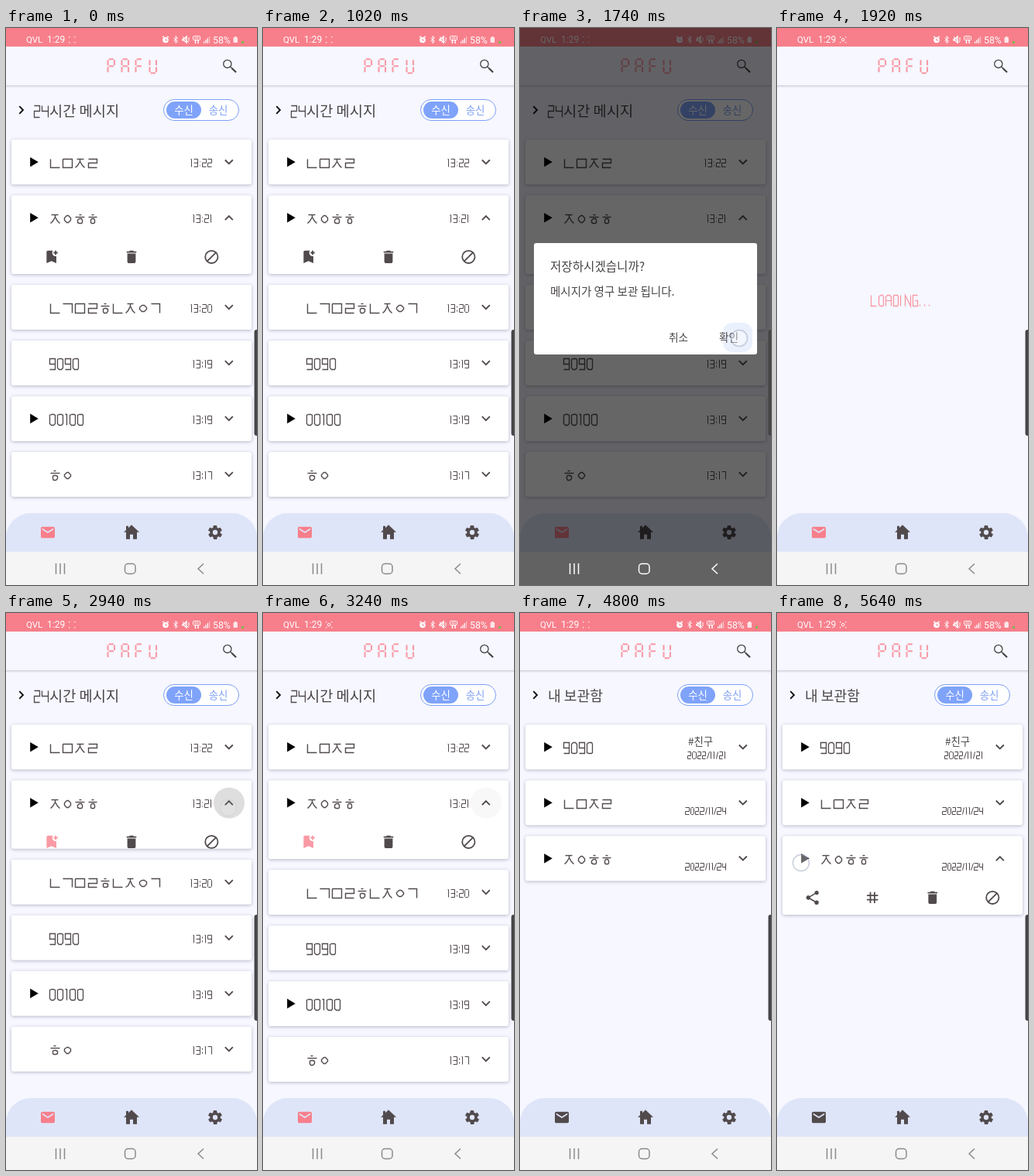
An HTML page with a canvas that plays this animation: 324x720 px, repeating every 5700 ms.

```html
<!DOCTYPE html>
<html lang="ko">
<head>
<meta charset="utf-8">
<style>
html, body { margin: 0; width: 100%; height: 100%; overflow: hidden; background: #f6f7ff; }
canvas { display: block; }
</style>
</head>
<body>
<canvas id="stage" width="324" height="720"></canvas>
<script>
const c = document.getElementById('stage').getContext('2d');
const LOOP = 5700, STEP = 60;
const INK = '#514a4d', CORAL = '#f77f8b', PALE = '#f99aa5', BLUE = '#7d9ff5', BG = '#f6f7ff';
const KR = '"Noto Sans CJK KR", "Noto Sans CJK", sans-serif';

const ramp = (t, a, b) => Math.min(1, Math.max(0, (t - a) / (b - a)));
const smooth = u => u < .5 ? 2 * u * u : 1 - 2 * (1 - u) ** 2;
const within = (t, a, b) => t >= a && t < b;

// LCD glyphs: polylines of xy digit pairs, digits and letters on a 4 x 8 grid
const GLYPHS = {
  0: '103041473818070110', 1: '001018', 2: '004044040848', 3: '00404808 0444',
  4: '000444 4048', 7: '004048', 9: '440400404808',
  ':': '1213 1617', '/': '2008', '.': '0708',
  L: '000848', O: '103041473818070110', A: '080110304148 0444', D: '00304147380800',
  I: '0008', N: '08004840', G: '400008484424'
};
const NARROW = '1:/.I';
// jamo on an 8 x 8 grid
const JAMO = {
  ㄴ: '000888', ㄱ: '008088', ㅁ: '0080880800', ㄹ: '008084040888', ㅈ: '1070 40422608 426688',
  ㅇ: '315173755737151331', ㅎ: '3050 0282 345465675838272534'
};
const SEGMENTS = { a: [0, 0, 1, 0], b: [1, 0, 1, 1], c: [1, 1, 1, 2], d: [0, 2, 1, 2],
  e: [0, 1, 0, 2], f: [0, 0, 0, 1], g: [0, 1, 1, 1] };
const LOGO = { P: 'abefg', A: 'abcefg', F: 'aefg', U: 'bcdef' };

const icons = {
  trash: 'M6 19a2 2 0 0 0 2 2h8a2 2 0 0 0 2-2V7H6zM19 4h-3.5l-1-1h-5l-1 1H5v2h14z',
  save: 'M21 7h-2v2h-2V7h-2V5h2V3h2v2h2zM19 21l-7-3-7 3V5c0-1.1.9-2 2-2h7a5 5 0 0 0 5 7.9z',
  block: 'M12 2a10 10 0 1 0 0 20 10 10 0 0 0 0-20zM4 12A8 8 0 0 1 16.9 5.7L5.7 16.9A8 8 0 0 1 4 12zM12 20a8 8 0 0 1-4.9-1.7L18.3 7.1A8 8 0 0 1 12 20z',
  share: 'M18 16.1c-.8 0-1.4.3-2 .8l-7.1-4.2a3.3 3.3 0 0 0 0-1.4l7-4.1A3 3 0 1 0 15 5c0 .2 0 .5.1.7L8 9.8a3 3 0 1 0 0 4.4l7.1 4.2a3 3 0 1 0 2.9-2.3z',
  hash: 'M20 10V8h-4V4h-2v4h-4V4H8v4H4v2h4v4H4v2h4v4h2v-4h4v4h2v-4h4v-2h-4v-4zM14 14h-4v-4h4z',
  mail: 'M20 4H4a2 2 0 0 0-2 2v12c0 1.1.9 2 2 2h16a2 2 0 0 0 2-2V6a2 2 0 0 0-2-2zm0 4-8 5-8-5V6l8 5 8-5z',
  home: 'M12 2.5L8 6.5V4H5v5.3L2 12h3v9h5v-6h4v6h5v-9h3z',
  gear: 'M19.4 13a7.5 7.5 0 0 0 0-2l2.1-1.6a.5.5 0 0 0 .1-.6l-2-3.5a.5.5 0 0 0-.6-.2l-2.5 1a7.3 7.3 0 0 0-1.7-1l-.4-2.6a.5.5 0 0 0-.5-.5h-4a.5.5 0 0 0-.5.5l-.4 2.6a7.3 7.3 0 0 0-1.7 1l-2.5-1a.5.5 0 0 0-.6.2l-2 3.5a.5.5 0 0 0 .1.6L4.6 11a7.5 7.5 0 0 0 0 2l-2.1 1.6a.5.5 0 0 0-.1.6l2 3.5c.1.2.4.3.6.2l2.5-1a7.3 7.3 0 0 0 1.7 1l.4 2.6c0 .3.2.5.5.5h4c.3 0 .5-.2.5-.5l.4-2.6a7.3 7.3 0 0 0 1.7-1l2.5 1c.2.1.5 0 .6-.2l2-3.5a.5.5 0 0 0-.1-.6zM12 15.5a3.5 3.5 0 1 1 0-7 3.5 3.5 0 0 1 0 7z'
};
for (const name in icons) icons[name] = new Path2D(icons[name]);

function icon(name, x, y, color = INK, scale = .9) {
  c.save();
  c.translate(x - 12 * scale, y - 12 * scale);
  c.scale(scale, scale);
  c.fillStyle = color;
  c.fill(icons[name], 'evenodd');
  c.restore();
}

function text(str, x, cy, size, color = '#4a4648', font = KR, align = 'left') {
  c.font = `${size}px ${font}`;
  c.textAlign = align;
  c.fillStyle = color;
  c.fillText(str, x, cy + size * .37);
}

function line(points, color, width = 1) {
  c.strokeStyle = color;
  c.lineWidth = width;
  c.beginPath();
  for (let i = 0; i < points.length; i += 2) c.lineTo(points[i], points[i + 1]);
  c.stroke();
}

function box(x, y, w, h, r, fill, stroke) {
  c.beginPath();
  c.roundRect(x, y, w, h, r);
  if (fill) { c.fillStyle = fill; c.fill(); }
  if (stroke) { c.strokeStyle = stroke; c.stroke(); }
}

function raised(x, y, w, h, blur = 4) {
  c.save();
  c.shadowColor = 'rgba(50,50,80,.33)';
  c.shadowBlur = blur;
  c.shadowOffsetY = 1;
  box(x, y, w, h, 3, '#fff');
  c.restore();
}

function disc(x, y, r, fill, stroke) {
  box(x - r, y - r, 2 * r, 2 * r, r, fill, stroke);
}

// strokes sit on pixel centres to stay crisp
function glyph(code, x, y, ux, uy, color, width) {
  const snap = v => Math.floor(v) + .5;
  for (const stroke of code.split(' '))
    line([...stroke].map((d, i) => snap(i % 2 ? y + d * uy : x + d * ux)), color, width);
}

const lcdWidth = (str, h) =>
  [...str].reduce((sum, ch) => sum + (NARROW.includes(ch) ? .42 : .7) * h, 0);

function lcd(str, x, cy, h, color = INK, right = false) {
  if (right) x -= lcdWidth(str, h) - .14 * h;
  for (const ch of str) {
    glyph(GLYPHS[ch], x + .4, cy - h / 2, h * .12, h / 8, color, h > 12 ? 1.3 : 1);
    x += lcdWidth(ch, h);
  }
}

function jamo(str, x, cy) {
  [...str].forEach((ch, i) => glyph(JAMO[ch], x + i * 16.2 + .5, cy - 5.5, 1.45, 1.4, INK, 1.4));
}

function chevron(x, y, up, color = INK) {
  const s = up ? -1 : 1;
  line([x - 5, y - 2.5 * s, x, y + 2.5 * s, x + 5, y - 2.5 * s], color, 1.9);
}

function statusBar(t) {
  const white = '#fff';
  c.fillStyle = CORAL;
  c.fillRect(0, 0, 324, 24);
  text('QVL', 26, 15, 11.5, white, 'Roboto, sans-serif');
  text('1:29', 53, 15, 12, white, 'Roboto, sans-serif');
  text('58%', 267, 15, 12.3, white, 'Roboto, sans-serif');
  c.fillStyle = 'rgba(255,255,255,.85)';
  const busy = Math.floor((t - 120) / 300) % 2 === 0;
  for (const x of [81, 88]) for (const y of [11, 18]) c.fillRect(x, y, 1.4, 1.4);
  if (busy) {
    c.lineWidth = 1;
    disc(85.2, 15.2, 1.8, null, white);
  }
  disc(206, 15.5, 3.8, white);
  line([202, 12, 204, 10.8], white, 1.4);
  line([208, 10.8, 210, 12], white, 1.4);
  line([206, 13.5, 206, 16, 208, 16], CORAL);
  line([216.5, 13, 221.5, 17.2, 219, 19.5, 219, 10.5, 221.5, 12.8, 216.5, 17], white);
  line([228, 14, 230, 14, 233, 11, 233, 19, 230, 16, 228, 16, 228, 14], white, 1.4);
  line([228, 11, 236, 19], white);
  line([236, 12, 236, 17], white);
  box(241.5, 10.5, 9, 5, 1, null, white);
  line([243, 13, 249, 13], white);
  line([244.5, 16, 244.5, 20], white, 1.5);
  line([248, 16, 248, 20], white, 1.5);
  for (let i = 0; i < 4; i++) {
    c.fillStyle = i < 3 ? white : 'rgba(255,255,255,.5)';
    c.fillRect(255 + i * 2.3, 17.5 - i * 2.2, 1.3, 2.2 + i * 2.2);
  }
  box(293.5, 12, 5.5, 7, 1, 'rgba(255,255,255,.8)');
  c.fillRect(295, 11, 2.5, 1);
  disc(305.5, 18.5, 1.5, '#5cc83c');
}

function header() {
  c.save();
  c.shadowColor = 'rgba(50,50,80,.28)';
  c.shadowBlur = 3;
  c.shadowOffsetY = 1;
  c.fillStyle = BG;
  c.fillRect(-6, 24, 336, 50);
  c.restore();
  [...'PAFU'].forEach((ch, i) => {
    for (const s of LOGO[ch]) {
      const [x1, y1, x2, y2] = SEGMENTS[s], flat = y1 === y2;
      const x = 131.5 + i * 18, gx = flat ? 1.1 : 0, gy = flat ? 0 : 1.1;
      line([x + x1 * 8.5 + gx, 40.3 + y1 * 9 + gy, x + x2 * 8.5 - gx, 40.3 + y2 * 9 - gy], PALE, 2.1);
    }
  });
  c.lineWidth = 1.3;
  disc(285.8, 46.4, 5.1, null, '#444');
  line([289.5, 50, 292, 52.5], '#444', 1.3);
  line([291.5, 52, 297, 57.3], '#444', 2.2);
}

function titleRow(archive, open) {
  if (open) chevron(20, 106, true, '#111');
  else line([17.3, 101.2, 22, 106, 17.3, 110.8], '#111', 1.9);
  if (archive) text('내 보관함', 36, 107, 18.2);
  else {
    lcd('24', 36, 107.5, 15);
    text('시간 메시지', 56, 107, 18.7);
  }
  c.lineWidth = 1;
  box(203.5, 92.5, 97, 27, 13.5, '#fff', BLUE);
  box(207, 95, 45, 22, 11, '#7fa3fa');
  text('수신', 229.5, 106.5, 13.4, '#fff', KR, 'center');
  text('송신', 274, 106.5, 13.4, BLUE, KR, 'center');
}

function card(y, row, p, tools) {
  const h = 58 + 43.7 * p, up = p > 0;
  raised(7, y, 310, h);
  if (row.play) {
    c.fillStyle = '#000';
    c.beginPath();
    c.moveTo(31.2, y + 22.7);
    c.lineTo(41.8, y + 29);
    c.lineTo(31.2, y + 35.3);
    c.fill();
  }
  if (JAMO[row.msg[0]]) jamo(row.msg, 57, y + 30.5);
  else lcd(row.msg, 56, y + 30.5, 14.5);
  if (row.time) lcd(row.time, 266, y + 30.5, 10, INK, true);
  else lcd(row.date, 266, y + 40, 9.2, INK, true);
  if (row.tag) text(row.tag, 217, y + 22, 13.4);
  chevron(287.8, y + (up ? 29.5 : 28.8), up);
  if (!up) return;
  c.save();
  c.beginPath();
  c.rect(7, y, 310, h);
  c.clip();
  tools.forEach(([name, color], i) => icon(name, 7 + 310 * (i + .5) / tools.length, y + 79.7, color));
  c.restore();
}

function list(rows, openRow, p, tools) {
  let y = 144.2;
  rows.forEach((row, i) => {
    const q = i === openRow ? p : 0;
    card(y, row, q, tools);
    y += 72 + 43.7 * q;
  });
}

const INBOX = [
  { msg: 'ㄴㅁㅈㄹ', time: '13:22', play: true },
  { msg: 'ㅈㅇㅎㅎ', time: '13:21', play: true },
  { msg: 'ㄴㄱㅁㄹㅎㄴㅈㅇㄱ', time: '13:20' },
  { msg: '9090', time: '13:19' },
  { msg: '00100', time: '13:19', play: true },
  { msg: 'ㅎㅇ', time: '13:17' }
];
const ARCHIVE = [
  { msg: '9090', date: '2022/11/21', tag: '#친구', play: true },
  { msg: 'ㄴㅁㅈㄹ', date: '2022/11/24', play: true },
  { msg: 'ㅈㅇㅎㅎ', date: '2022/11/24', play: true }
];
// x, y, press, release
const TAPS = [[59, 298, 1200, 1320], [283, 401, 1620, 1840], [287, 252, 2820, 2960],
  [85, 110, 3600, 3780], [60, 160, 4260, 4440], [288, 321, 5160, 5340], [31, 323, 5580, 5760]];

function ripple(x, y, t, start) {
  const a = t < start ? 0 : .13 * (1 - ramp(t, start + 180, start + 480));
  if (a) disc(x, y, 12 + 8 * ramp(t, start - 60, start + 60), `rgba(0,0,0,${a})`);
}

function tabs(archive) {
  box(0, 627, 324, 60, [32, 32, 0, 0], '#dfe5f8');
  icon('mail', 54, 652, archive ? INK : CORAL);
  icon('home', 162, 651.7, INK, 1);
  icon('gear', 270, 652, INK);
  c.fillStyle = '#f5f5f5';
  c.fillRect(0, 677, 324, 43);
}

function systemKeys(dim) {
  const v = 138 + 117 * dim, color = `rgb(${v},${v},${v})`;
  for (const x of [64.5, 70, 75.5]) line([x, 692, x, 706], color, 1.5);
  c.lineWidth = 1.5;
  box(153.5, 692.5, 13.5, 13, 4, null, color);
  line([255, 692.5, 248, 699, 255, 705.5], color, 1.5);
}

function dialog(t, alpha) {
  c.save();
  c.globalAlpha = alpha;
  box(18, 278, 288, 144, 3, '#fff');
  if (t >= 1620) box(262, 381, 38, 38, 12, '#eaf1fd');
  text('저장하시겠습니까?', 39, 308, 15.6);
  text('메시지가 영구 보관 됩니다.', 39, 341, 14.5);
  text('취소', 192, 400, 13.7);
  text('확인', 257, 400, 13.7);
  c.restore();
}

function draw(t) {
  const archive = t >= 4440;
  const loading = within(t, 1860, 2160) || within(t, 4440, 4620);
  const menu = archive ? 0 : ramp(t, 3660, 3840);

  c.fillStyle = BG;
  c.fillRect(0, 0, 324, 720);
  header();
  statusBar(t);
  if (loading) lcd('LOADING...', 121.5, 352.7, 13.6, PALE);
  else {
    titleRow(archive, menu > 0);
    if (archive) {
      list(ARCHIVE, 2, smooth(ramp(t, 5182, 5342)), [['share'], ['hash'], ['trash'], ['block']]);
      ripple(288, 317.5, t, 5160);
    } else {
      const p = t < 1860 ? 1 : smooth(ramp(t, 2842, 3002));
      list(INBOX, 1, p, [['save', t < 1860 ? INK : PALE], ['trash'], ['block']]);
      ripple(59, 296, t, 1200);
      ripple(288, 245.5, t, 2820);
    }
  }
  if (menu) {
    c.save();
    c.globalAlpha = menu;
    raised(9, 128, 180, 58, 7);
    if (t >= 4260) box(9, 128, 180, 58, 3, 'rgba(0,0,0,.08)');
    text('내 보관함', 22.5, 158.5, 16.4);
    c.restore();
  }
  tabs(archive);

  const closing = 1 - ramp(t, 1770, 1910);
  const dim = ramp(t, 1255, 1440) * closing;
  if (dim) {
    c.fillStyle = `rgba(0,0,0,${.6 * dim})`;
    c.fillRect(0, 0, 324, 720);
  }
  systemKeys(dim);
  const alpha = ramp(t, 1240, 1346) * closing;
  if (alpha) dialog(t, alpha);

  box(320.5, 390, 8, 137, 3, '#454446');
  for (const [x, y, press, release] of TAPS) if (within(t, press, release)) {
    c.save();
    c.globalAlpha = 1 - ramp(t, release - 90, release);
    c.lineWidth = 1.5;
    disc(x, y, 10.5, 'rgba(255,255,255,.4)', 'rgba(150,160,185,.5)');
    c.restore();
  }
}

function frame() {
  draw(Math.floor(performance.now() % LOOP / STEP) * STEP);
  requestAnimationFrame(frame);
}
frame();
</script>
</body>
</html>
```
